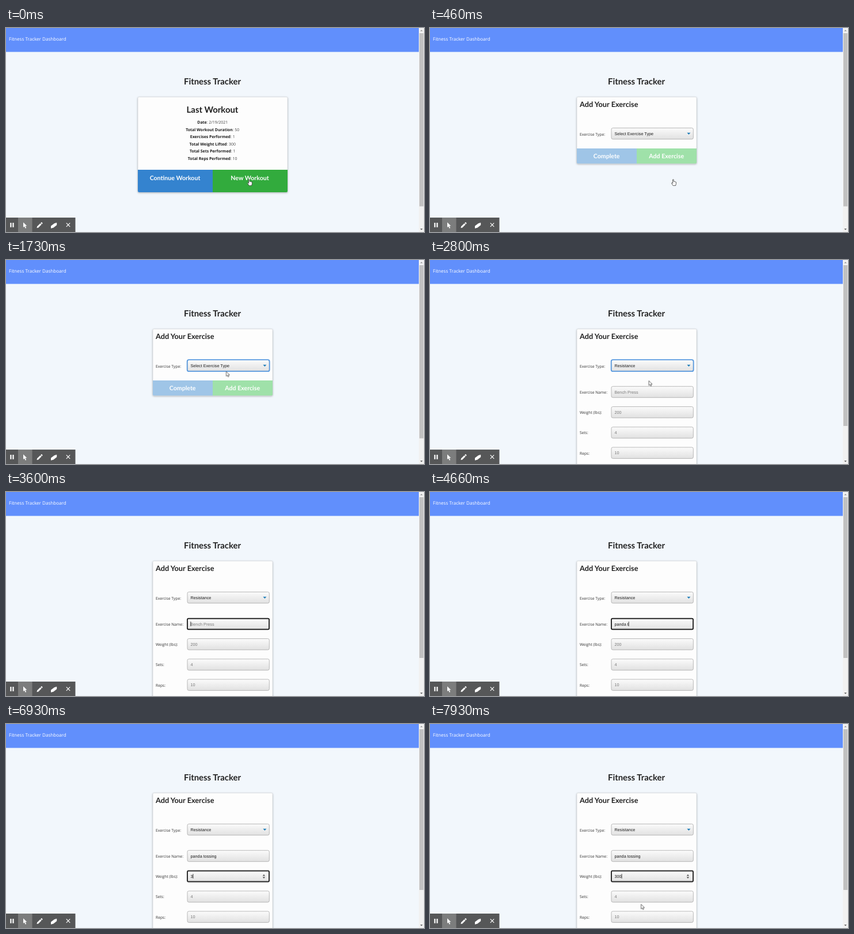
These frames come from a looping animation (726 px wide and 354 px high, 8000 ms). An HTML page:

```html
<!DOCTYPE html>
<html lang="en">
<head>
<meta charset="utf-8">
<title>Fitness Tracker</title>
<style>
html, body { margin: 0; width: 100%; height: 100%; overflow: hidden; background: #f2f7fc; }
svg { display: block; width: 726px; height: 354px; }
text { text-rendering: geometricPrecision; white-space: pre; }

.head { font: 700 14.9px Lato, sans-serif; fill: #212121; }
.sub { font-size: 12.74px; }
.btn { font: 700 10.6px Lato, sans-serif; fill: #fff; }
.mid { text-anchor: middle; }
.nav { font: 8.1px "Open Sans", sans-serif; fill: #fff; }
.stat { font: 6.93px "Open Sans", sans-serif; fill: #444; text-anchor: middle; }
.stat tspan { font-weight: 700; fill: #1c1c1c; }
.label { font: 6.75px "Open Sans", sans-serif; fill: #333; }
.field { font: 7.25px "Liberation Sans", Arial, sans-serif; fill: #1b1b1b; }
.hint { fill: #7b7b7b; }
.card { fill: #fdfdfd; stroke: #d2d5d8; stroke-width: .6; }
.lift { filter: drop-shadow(0 1px 1.6px rgba(34, 36, 38, .32)); }
.focus { fill: none; stroke: #111; stroke-width: 1.7; }

/* one 8 s clock for every part */
.last, .entry, .brief, .form, .typing-name, .typing-weight, .picked, .spinner, .hand, .arrow, .spot {
  animation: 8s step-end infinite;
}
.last { animation-name: last; }
.entry { animation-name: entry; }
.brief { animation-name: brief; }
.form { animation-name: form; }
.early { animation: early 8s step-end infinite; }
.picked { animation-name: picked; }
.typing-name { animation-name: typing-name; }
.typing-weight { animation-name: typing-weight; }
.spinner { animation-name: spinner; }
.hand { animation-name: hand; }
.arrow { animation-name: arrow; }
.path { animation: path 8s linear infinite; }
.spot { animation-name: spot; }
.ring { animation: ring 8s linear infinite; fill: none; stroke: #ea7c82; stroke-width: 2; }

@keyframes last { 0% { opacity: 1 } 4.2%, 100% { opacity: 0 } }
@keyframes entry { 0% { opacity: 0 } 4.2%, 100% { opacity: 1 } }
@keyframes brief { 0% { opacity: 0 } 4.2% { opacity: 1 } 34.1%, 100% { opacity: 0 } }
@keyframes early { 0% { opacity: 1 } 34.1%, 100% { opacity: 0 } }
@keyframes form { 0% { opacity: 0 } 34.1%, 100% { opacity: 1 } }
@keyframes picked { 0% { opacity: 0 } 17.5% { opacity: 1 } 40%, 100% { opacity: 0 } }
@keyframes typing-name { 0% { opacity: 0 } 40% { opacity: 1 } 76.1%, 100% { opacity: 0 } }
@keyframes typing-weight { 0% { opacity: 0 } 76.1%, 100% { opacity: 1 } }
@keyframes spinner { 0% { opacity: 0 } 73.4%, 100% { opacity: 1 } }
@keyframes hand { 0% { opacity: 1 } 6.5%, 100% { opacity: 0 } }

/* the pointer shows only outside the text fields */
@keyframes arrow {
  0% { opacity: 0 } 6.5% { opacity: 1 } 37.5% { opacity: 0 }
  70.7% { opacity: 1 } 73.4% { opacity: 0 }
  96.6% { opacity: 1 } 97.6% { opacity: 0 } 98.3%, 100% { opacity: 1 }
}
@keyframes path {
  0%, 6.5% { transform: translate(422px, 262px); animation-timing-function: ease-in-out }
  16.6%, 33.2% { transform: translate(382.5px, 193.5px) }
  34.1% { transform: translate(382px, 206px) }
  37.5%, 70% { transform: translate(375px, 219px) }
  70.7% { transform: translate(370px, 240px) }
  73.4%, 96.5% { transform: translate(364px, 254px) }
  96.6% { transform: translate(364px, 275px) }
  97.6% { transform: translate(365px, 290px) }
  98.3% { transform: translate(366px, 309px) }
  99%, 100% { transform: translate(366.6px, 312.7px) }
}
@keyframes spot {
  0% { transform: translate(423px, 267px) }
  10% { transform: translate(382.5px, 193.5px) }
  30% { transform: translate(375px, 229px) }
  60%, 100% { transform: translate(361px, 265.5px) }
}
@keyframes ring {
  0%, .7% { opacity: 0 } .75%, 2% { opacity: 1 } 3.3%, 17.45% { opacity: 0 }
  17.5%, 18.7% { opacity: 1 } 20.5%, 39.95% { opacity: 0 }
  40%, 41.2% { opacity: 1 } 43%, 76.05% { opacity: 0 }
  76.1%, 77.4% { opacity: 1 } 79%, 100% { opacity: 0 }
}
</style>
</head>
<body>
<svg viewBox="0 0 726 354">
  <defs>
    <linearGradient id="shade" x2="0" y2="1">
      <stop stop-color="#fbfbfb"/><stop offset="1" stop-color="#e1e1e1"/>
    </linearGradient>
    <rect id="box" x="315" y="-9.7" width="142.3" height="19.4" rx="2.6" fill="url(#shade)" stroke="#a9a9a9" stroke-width=".8"/>
    <rect id="outline" class="focus" x="315" y="-9.4" width="142" height="18.8" rx="1.8"/>
  </defs>

  <rect width="726" height="354" fill="#f2f7fc"/>
  <rect width="717" height="41.5" fill="#618ffc"/>
  <text class="nav" x="5" y="21.8">Fitness Tracker Dashboard</text>
  <text class="head mid" x="358.5" y="98">Fitness Tracker</text>

  <g class="last">
    <rect class="card lift" x="229" y="119.7" width="260" height="165.3" rx="2"/>
    <text class="head mid" x="358.5" y="147.3">Last Workout</text>
    <text class="stat" x="358.7" y="166"><tspan>Date</tspan>: 2/19/2021</text>
    <text class="stat" x="358.7" y="178.5"><tspan>Total Workout Duration</tspan>: 50</text>
    <text class="stat" x="358.7" y="191"><tspan>Exercises Performed</tspan>: 1</text>
    <text class="stat" x="358.7" y="203.5"><tspan>Total Weight Lifted</tspan>: 300</text>
    <text class="stat" x="358.7" y="216"><tspan>Total Sets Performed</tspan>: 1</text>
    <text class="stat" x="358.7" y="228.5"><tspan>Total Reps Performed</tspan>: 10</text>
    <path d="M229 246h130v39H231a2 2 0 0 1-2-2z" fill="#3483cf"/>
    <path d="M359 246h130v37a2 2 0 0 1-2 2H359z" fill="#32ab3d"/>
    <text class="btn mid" x="293.5" y="263.6">Continue Workout</text>
    <text class="btn mid" x="423.5" y="263.6">New Workout</text>
  </g>

  <g class="brief">
    <rect class="card lift" x="255" y="119.7" width="208" height="115.6" rx="2"/>
    <path d="M255 209h104v26.3H257a2 2 0 0 1-2-2z" fill="#9fc5e7"/>
    <path d="M359 209h104v24.3a2 2 0 0 1-2 2H359z" fill="#9fe1a9"/>
    <text class="btn mid" x="306.7" y="226.3">Complete</text>
    <text class="btn mid" x="410.7" y="226.3">Add Exercise</text>
  </g>

  <g class="form">
    <rect class="card lift" x="255" y="119.7" width="208" height="260" rx="2"/>
    <text class="label" x="260" y="231.8">Exercise Name:</text>
    <text class="label" x="260" y="267.1">Weight (lbs):</text>
    <text class="label" x="260" y="302.4">Sets:</text>
    <text class="label" x="260" y="337.7">Reps:</text>
    <use href="#box" y="229"/>
    <use href="#box" y="264.2"/>
    <use href="#box" y="299.5"/>
    <use href="#box" y="334.7"/>
    <use href="#outline" class="typing-name" y="229"/>
    <use href="#outline" class="typing-weight" y="264.2"/>
    <text id="name" class="field" x="320.5" y="231.6"></text>
    <text id="weight" class="field" x="320.5" y="266.8"></text>
    <text class="field hint" x="320.5" y="302.1">4</text>
    <text class="field hint" x="320.5" y="337.3">10</text>
    <path class="spinner" d="M445.7 263.4l2.2-2.5 2.2 2.5zM445.7 265.4l2.2 2.5 2.2-2.5z" fill="#444"/>
    <rect id="caret" width=".8" height="8" fill="#111"/>
  </g>

  <g class="entry">
    <text class="head sub" x="260" y="137">Add Your Exercise</text>
    <text class="label" x="260" y="186.6">Exercise Type:</text>
    <use href="#box" y="183.2"/>
    <rect class="picked" x="314.7" y="173.2" width="143" height="20" rx="3" fill="none" stroke="#5a9be0" stroke-width="1.8"/>
    <text id="type" class="field" x="320.5" y="185.9"></text>
    <path d="M446.4 181.7h6l-3 3.2z" fill="#1c7cb8"/>
  </g>

  <g>
    <rect x="717" width="9" height="354" fill="#f1f1f1"/>
    <rect x="718" y="9" width="7.2" height="279" fill="#c1c1c1"/>
    <rect class="early" x="718" y="287" width="7.2" height="22.5" fill="#c1c1c1"/>
    <path d="M719.4 5.6l2.2-2.4 2.2 2.4z" fill="#909090"/>
    <path d="M719.4 348.2l2.2 2.4 2.2-2.4z" fill="#505050"/>
  </g>

  <g fill="#fff">
    <rect y="329" width="120.5" height="25" fill="#565758"/>
    <rect x="21" y="329" width="24.5" height="25" fill="#7c7d7d"/>
    <path d="M7.3 338h2.2v7.8H7.3zM11.4 338h2.2v7.8h-2.2z"/>
    <path d="M30 337.3v8.8l2.1-1.9 1.6 3.5 1.5-.7-1.6-3.4h2.8z"/>
    <path d="M53.5 347l.6-2.7 5.5-5.4 2.1 2.1-5.5 5.4zM60.2 338.3l1-1q.6-.4 1.1 0l1 1q.4.6 0 1.1l-1 1z"/>
    <path d="M78 343.4l6-4.4 4.2-1.2v4.1l-5.7 4.6-4.5 1.2z"/>
    <path d="M104.8 338.4l6.4 6.4m0-6.4l-6.4 6.4" fill="none" stroke="#fff" stroke-width="1.2"/>
  </g>

  <g class="spot"><circle class="ring" r="16.5"/></g>
  <path class="hand" transform="translate(419 262)" d="M2.6 1.1q.8-1 1.6 0V4.4q1-.5 1.5.2 1-.4 1.5.4 1.2-.2 1.2.9V8.6L7.5 11.6H3.3L.5 7.6Q.4 6.3 1.7 6.7L2.6 7.6z" fill="#fff" stroke="#333" stroke-width=".8" stroke-linejoin="round"/>
  <g class="path">
    <path class="arrow" d="M0 0V8.2L1.9 6.5 3.2 9.3 4.6 8.7 3.4 6H6z" fill="#fff" stroke="#333" stroke-width=".75" stroke-linejoin="round"/>
  </g>
</svg>
<script>
const LOOP = 8000;
const FORM = 2728, NAME = 3200, WEIGHT = 6088;
const part = id => document.getElementById(id);
const type = part('type'), name_ = part('name'), weight = part('weight'), caret = part('caret');
const clock = document.querySelector('.ring').getAnimations()[0];

const within = (t, a, b) => t >= a && t < b;

function fill(field, typed, hint) {
  field.textContent = typed || hint;
  field.classList.toggle('hint', !typed);
}

function placeCaret(field, typed) {
  const width = typed ? field.getComputedTextLength() : 0;
  caret.setAttribute('x', +field.getAttribute('x') + width);
  caret.setAttribute('y', field.getAttribute('y') - 6.7);
}

function draw(t) {
  const letters = Math.max(0, Math.floor((t - 3950) / 115) + 1);
  const digits = [6800, 7000, 7260].filter(at => t >= at).length;
  const move = 'panda tossing'.slice(0, letters);
  const load = '300'.slice(0, digits);

  type.textContent = t < FORM ? 'Select Exercise Type' : 'Resistance';
  fill(name_, move, 'Bench Press');
  fill(weight, load, '200');
  if (t < WEIGHT) placeCaret(name_, move);
  else placeCaret(weight, load);

  const blink = within(t, 3590, 3950) || within(t, 5830, WEIGHT)
    || within(t, 6530, 6800) || within(t, 7530, 7730);
  caret.style.opacity = t < NAME || blink ? 0 : 1;
}

function frame() {
  draw((clock.currentTime || 0) % LOOP);
  requestAnimationFrame(frame);
}
frame();
</script>
</body>
</html>
```
